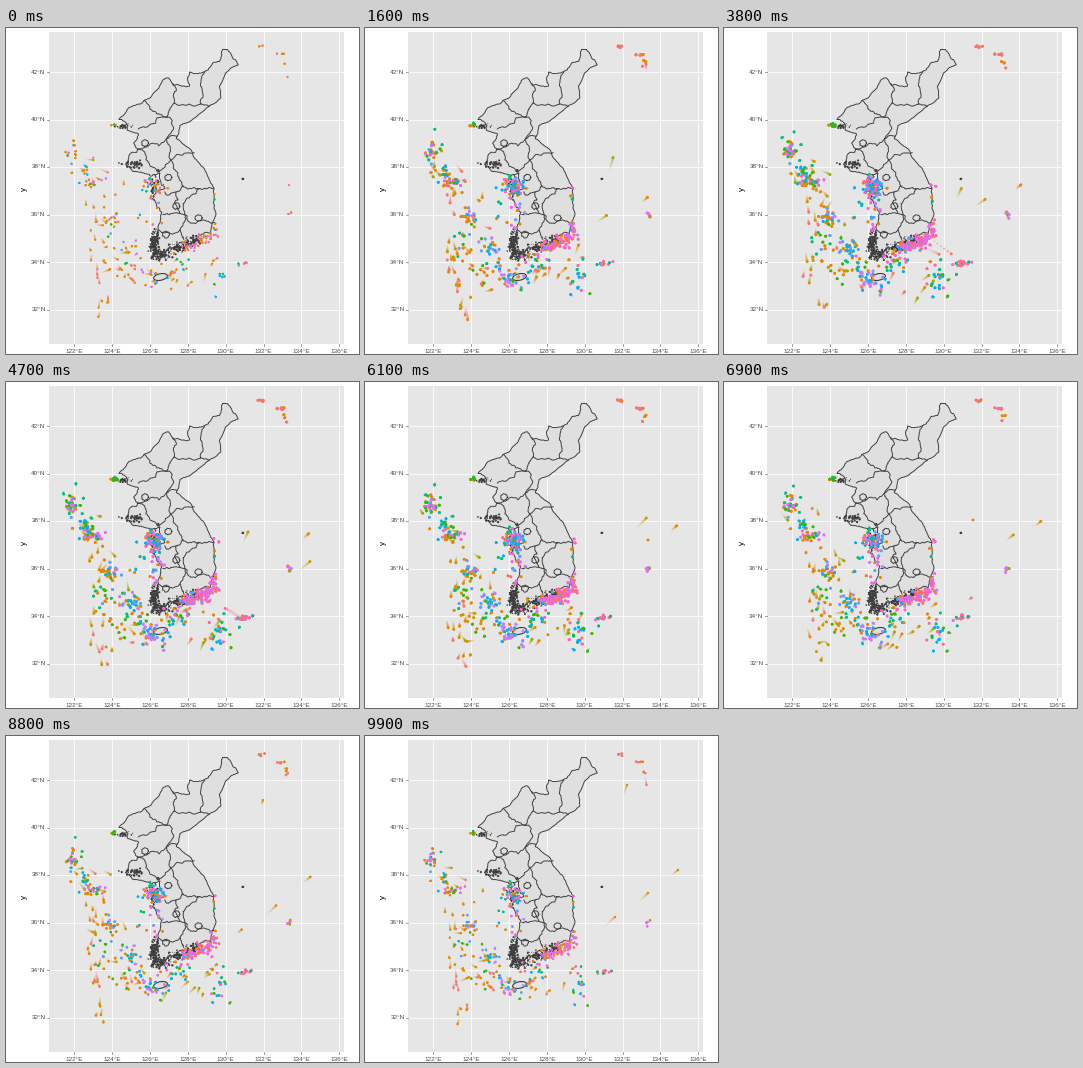
Recreate the animation shown at these times as a matplotlib script. Size 353 px wide and 326 px high, loop 10 s.

```python
import numpy as np
import matplotlib.pyplot as plt
from matplotlib.animation import FuncAnimation
from matplotlib.colors import to_rgb
from matplotlib.patches import Rectangle, Ellipse

W, H, DPI = 353, 326, 64
PT = 72 / DPI                      # points per pixel
FRAMES, STEP, WAKE = 100, 100, 10
INK, LAND, PANEL = "#3d3d3d", "#dfdfdf", "#e6e6e6"
rng = np.random.default_rng(12)

fig = plt.figure(figsize=(W / DPI, H / DPI), dpi=DPI, facecolor="white")
ax = fig.add_axes([0, 0, 1, 1])
ax.set(xlim=(0, W), ylim=(H, 0))
ax.axis("off")


def project(pts):
    lon, lat = np.array(pts, float).T
    return np.column_stack([68 + (lon - 122) * 18.93, 44 + (42 - lat) * 23.75])


def rough(p, amp):
    """Midpoint displacement: makes a coarse line look surveyed."""
    for _ in range(4):
        seg = np.hypot(*np.diff(p, axis=0).T)[:, None]
        if seg.max() < 1.5:
            break
        mid = (p[:-1] + p[1:]) / 2 + amp * seg * rng.normal(0, 1, seg.shape * np.array([1, 2]))
        out = np.empty((len(p) + len(mid), 2))
        out[::2], out[1::2] = p, mid
        p = out
    return p


# ---- panel, grid and axis labels
ax.add_patch(Rectangle((43, 4), 295, 312, fc=PANEL, lw=0, zorder=0))
label = dict(family="Liberation Sans", size=6.4 * PT, color="#4d4d4d")
grid = dict(color="white", lw=0.8 * PT, zorder=1)
tick = dict(color="#555555", lw=0.6 * PT)
for i in range(8):
    x = 68.2 + 37.86 * i
    ax.plot([x, x], [4, 316], **grid)
    ax.plot([x, x], [316, 318], **tick)
    ax.text(x, 323.2, f"{122 + 2 * i}°E", ha="center", va="center", **label)
for i in range(6):
    y = 44 + 47.5 * i
    ax.plot([43, 338], [y, y], **grid)
    ax.plot([41, 43], [y, y], **tick)
    ax.text(39.6, y, f"{42 - 2 * i}°N", ha="right", va="center", **label)
ax.text(18, 161, "y", rotation=90, ha="center", va="center",
        family="Liberation Sans", size=8 * PT, color="black")

# ---- peninsula
north = [(124.37, 40), (124.9, 40.5), (126, 40.9), (126.75, 41.7),
         (127, 41.75), (127.3, 41.45), (128.1, 41.4), (128.1, 42),
         (128.95, 42.05), (129.35, 42.4), (129.7, 42.45), (129.85, 42.95),
         (130.1, 42.95), (130.68, 42.3)]
east = [(130.68, 42.3), (130, 41.95), (129.68, 41.4), (129.75, 40.9),
        (129.2, 40.6), (128.3, 40.03), (127.6, 39.75), (127.4, 39.2),
        (128.2, 38.7), (129, 37.75), (129.4, 37.1), (129.5, 36.05),
        (129.2, 35.2)]
south = [(129.2, 35.2), (128.6, 35.1), (127.75, 34.85), (127.3, 34.6),
         (126.5, 34.35), (126.3, 34.6)]
west = [(126.3, 34.6), (126.4, 35.3), (126.6, 36), (126.2, 36.8),
        (126.8, 37.1), (126.55, 37.75), (125.6, 37.75), (124.75, 38.12),
        (125.4, 38.75), (125.15, 39), (125.4, 39.4), (124.37, 40)]
shore = np.vstack([rough(project(p), a) for p, a in
                   [(north, .07), (east, .05), (south, .14), (west, .12)]])
ax.fill(*shore.T, fc=LAND, ec=INK, lw=0.95 * PT, zorder=2)

# province borders: lettered junctions, joined in words
junctions = dict(zip("abcdefghijklmnopqrstuvwxyzABCDEFG", project([
    (125.7, 40.8), (126.25, 40.35), (126.9, 40.1), (125.4, 39.6), (127.2, 41.5),
    (127.3, 40.7), (126.9, 39.2), (128.7, 40.65), (128.9, 42), (128.8, 41.1),
    (129.15, 40.55), (127.45, 39.3), (125.4, 38.75), (127.1, 38.3), (125.8, 38.3),
    (126.5, 37.8), (128.35, 38.6), (127.55, 37.5), (127.75, 37.2), (129.37, 37.1),
    (126.8, 36.95), (127.4, 36.95), (127.6, 36.05), (127.85, 36), (128.6, 37.08),
    (127.9, 36.6), (126.7, 36), (127.6, 35.35), (127.8, 34.95), (126.45, 35.35),
    (128.4, 35.62), (129.45, 35.65), (127.3, 36.5)])))
words = "abc dc ef fc cg fh ijhk gl mg gn mop pnq nrs syt uvs vGw yzx AwxEF xBC DB"
lines = [np.array([junctions[c] for c in word]) for word in words.split()]
ring = np.linspace(0, 2 * np.pi, 8)
cities = [(126.98, 37.56), (127.4, 36.35), (126.85, 35.15), (128.58, 35.85),
          (125.75, 39)]
for cx, cy in project(cities):
    lines.append(np.column_stack([cx + 3.6 * np.cos(ring), cy + 3.4 * np.sin(ring)]))
for p in lines:
    ax.plot(*rough(p, 0.12).T, color=INK, lw=0.95 * PT, zorder=3)

ax.add_patch(Ellipse((154.5, 249), 14, 6.5, angle=-12, fc=LAND, ec=INK,
                     lw=1.1 * PT, zorder=3))
# n, x, y, spread x, spread y
islets = [(150, 148.5, 217, 2.4, 7), (70, 156, 227, 5, 2.6),
          (60, 171, 220, 5, 2.6), (50, 187, 213, 5, 2.6), (50, 127, 136, 5, 2),
          (22, 117, 98.5, 4, 1.2), (45, 149, 159, 3.2, 6), (3, 236.5, 151, .5, .2)]
for n, cx, cy, sx, sy in islets:
    ax.scatter(rng.normal(cx, sx, n), rng.normal(cy, sy, n), lw=0, color=INK,
               s=(rng.uniform(0.9, 2.5, n) * PT) ** 2, zorder=3)

# ---- moving points
HUES = dict(zip("rogyGtsbvmpR", [
    "#F8766D", "#E58700", "#C99800", "#A3A500", "#39B600", "#00BF7D",
    "#00B0F6", "#619CFF", "#B983FF", "#E76BF3", "#FD61D1", "#FF67A4"]))
t = np.arange(FRAMES) * STEP / 1000
share = np.interp(t, [0, 1.6, 3.8, 6.1, 7.7, 9.9], [.33, .75, 1, .95, .85, .65])
scale = np.interp(t, [0, 1.6, 6.1, 9.9], [2.3, 3, 3, 2.5])
xs, ys, shown, hues = [], [], [], []


def add(x, y, on, hue):
    xs.append(x)
    ys.append(y)
    shown.append(on)
    hues.append(to_rgb(HUES[hue]))


def sway(reach):
    k, phase = rng.integers(1, 4), rng.uniform(0, 2 * np.pi)
    return rng.uniform(0.2, reach) * np.sin(0.2 * np.pi * k * t + phase)


def cluster(n, cx, cy, sx, sy, palette):
    """Points that hover around a place; more of them show as share rises."""
    for i in range(n):
        early = i / n < 0.25 and rng.random() < 0.5
        add(rng.normal(cx, sx) + sway(2.2), rng.normal(cy, sy) + sway(min(sy, 2.2)),
            i / n < share, "o" if early else rng.choice(list(palette)))


def drift(n, x0, x1, y0, y1, angle, spread):
    """Fast points crossing a box, each with a short life."""
    for _ in range(n):
        born, life = rng.uniform(0, 10), rng.uniform(2, 3.6)
        age = (t - born) % 10
        th = np.radians(rng.normal(angle, spread))
        go = rng.uniform(4, 13) * (age - life / 2)
        late = born > 8 or born < 0.4
        add(rng.uniform(x0, x1) + go * np.cos(th),
            rng.uniform(y0, y1) + go * np.sin(th) + np.sin(age * 2),
            age < life, rng.choice(list("roo" if late else "gggoyr")))


def track(hue, t0, x0, y0, t1, x1, y1):
    """One point on a straight course."""
    u = (t - t0) / (t1 - t0)
    add(x0 + (x1 - x0) * u, y0 + (y1 - y0) * u, (u >= 0) & (u <= 1), hue)


drift(46, 80, 93, 165, 255, 86, 12)
drift(36, 94, 126, 165, 260, 75, 28)
drift(20, 68, 98, 132, 154, 42, 18)
drift(18, 88, 108, 255, 288, 95, 20)
drift(18, 112, 142, 222, 262, 35, 35)
drift(44, 160, 215, 222, 262, -50, 22)

cluster(36, 66, 122, 4, 5.5, "Gtbmp")
cluster(16, 76, 142, 6, 5, "tsvG")
cluster(34, 86, 154, 5.5, 3.2, "Gsmpov")
cluster(22, 105, 190, 5, 4.5, "sbvmpGo")
cluster(26, 95, 215, 9, 24, "tGbog")
cluster(28, 125, 222, 5, 6, "sbvmpto")
cluster(18, 128, 242, 11, 8, "Gtso")
cluster(14, 138, 180, 6, 14, "mst")
cluster(70, 149, 159, 4.5, 5, "ppmbst")
cluster(12, 152, 187, 2.5, 10, "sbvmp")
cluster(36, 147, 252, 5.5, 5, "sbvmG")
cluster(40, 182, 219, 4.5, 3, "ppRmrbv")
cluster(40, 194, 214, 4.5, 3.5, "ppRmrb")
cluster(20, 203, 208, 3, 3, "ppRmvs")
cluster(18, 208, 201, 2.2, 4.5, "pRmrvs")
cluster(24, 172, 234, 9, 6, "Gtsp")
cluster(24, 215, 248, 7, 11, "tGbRs")
cluster(16, 238, 236, 3.6, 1.3, "rRmt")
cluster(7, 108, 97, 1.8, 1, "GGt")
cluster(4, 207, 163, 2.5, 11, "vtp")
cluster(5, 254.5, 18.6, 1.6, .5, "r")
cluster(7, 274, 26, 2.2, .7, "rrR")
cluster(3, 280.5, 36, .6, 2, "or")
cluster(6, 283, 186, 1, 8, "Gymv")

track("o", .6, 276, 175, 8, 324, 133)
track("o", 7, 249, 190, 9.9, 283, 157)
track("r", 0, 283, 157, .5, 287, 154)
track("g", 6.1, 283, 158, 9.9, 313, 134)
track("g", 5, 268, 150, 6.5, 286, 131)
track("g", 3, 233, 170, 4.7, 242, 150)
track("g", 2.9, 250, 179, 4.2, 266, 168)
track("g", .8, 232, 194, 2.4, 251, 181)
track("y", 1, 245, 141, 2, 250, 122)
track("g", 6.9, 249, 138, 8.2, 254, 113)
track("g", 8.6, 256, 67, 9.9, 262, 49)
track("o", 8.6, 233, 196, 9.9, 250, 181)
track("r", 6.8, 246, 217, 8.2, 265, 202)
track("g", 3.9, 293, 189, 5, 308, 176)
track("r", 7.1, 263, 24, 8, 272, 39)
track("r", 3.1, 203, 208, 4.2, 241, 236)
track("r", 3.4, 206, 222, 4.9, 240, 238)
track("R", 3.5, 240, 236, 5, 214, 224)
track("r", 0, 281.5, 49, 1.6, 281, 36)
track("r", 8.8, 280, 39, 9.9, 281.5, 49)

X, Y, ON = (np.array(a).T for a in (xs, ys, shown))
HUE = np.array(hues)
dots = ax.scatter([], [], lw=0, zorder=5)


def draw(i):
    pos, size, rgba = [], [], []
    for lag in range(WAKE - 1, -1, -1):
        j = (i - lag) % FRAMES
        m = ON[i] & ON[j]
        n, fade = m.sum(), 1 - lag / WAKE
        pos.append(np.column_stack([X[j, m], Y[j, m]]))
        size.append(np.full(n, (scale[i] * (0.25 + 0.75 * fade) * PT) ** 2))
        alpha = 1 if lag == 0 else 0.5 * fade
        rgba.append(np.column_stack([HUE[m], np.full(n, alpha)]))
    dots.set_offsets(np.vstack(pos))
    dots.set_sizes(np.concatenate(size), dpi=DPI)
    dots.set_facecolors(np.vstack(rgba))
    return dots,


anim = FuncAnimation(fig, draw, frames=FRAMES, interval=STEP, repeat=True,
                     repeat_delay=0, init_func=lambda: draw(0))
plt.show()
```
